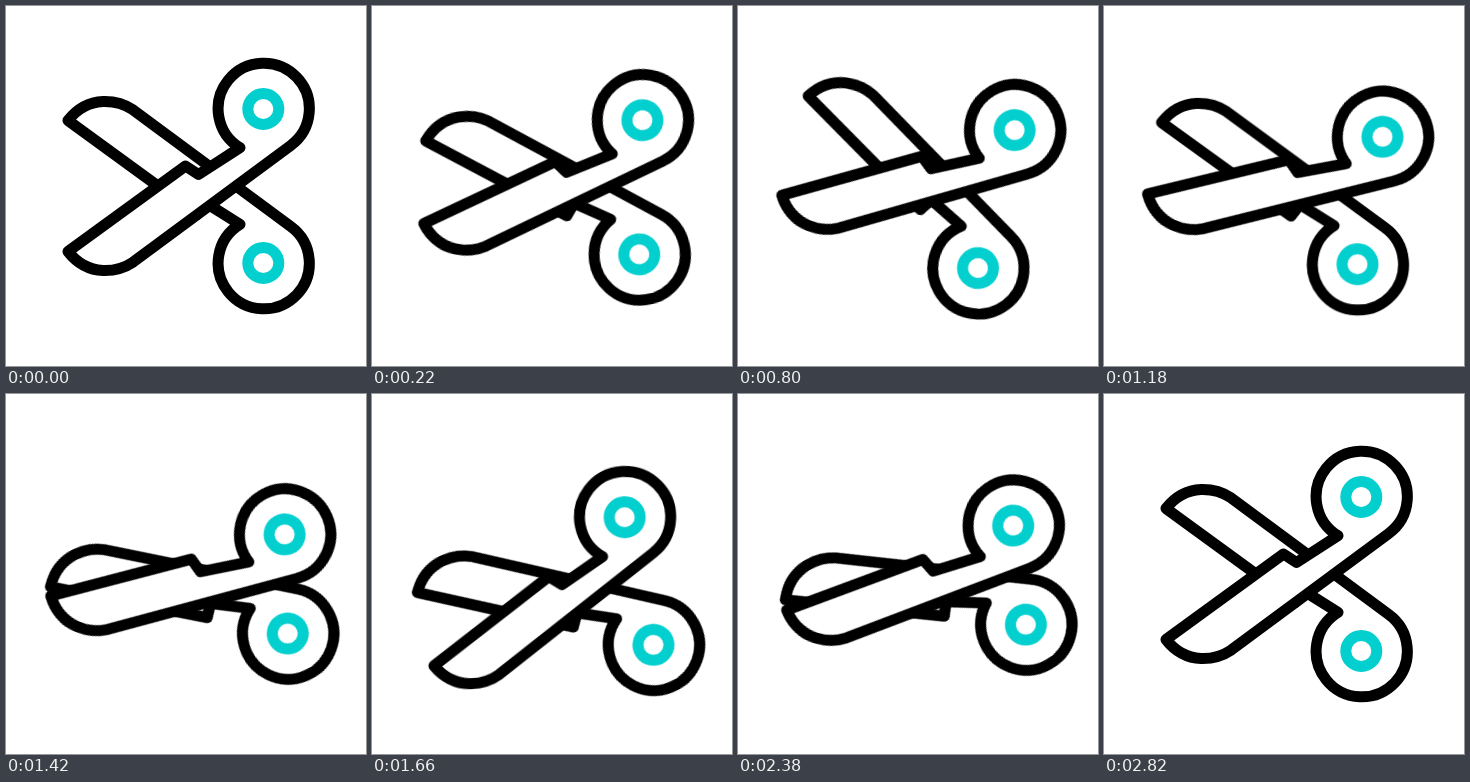
Animation of 360 by 360 pixels, one loop 3.6 s. Source, as an HTML page:

```html
<!DOCTYPE html>
<html lang="en">
<head>
<meta charset="utf-8">
<title>Scissors</title>
<style>
  html, body { margin: 0; width: 100%; height: 100%; overflow: hidden; background: #fff; }
  svg { display: block; width: 100vw; height: 100vh; }
  path { fill: #fff; stroke: #000; }
  circle { fill: none; stroke: #04cfcf; }
  path, circle { stroke-width: 11; stroke-linejoin: round; }
  g { transform-origin: 203.5px 180px; }
</style>
</head>
<body>
<svg viewBox="0 0 360 360">
  <g id="body">
    <g id="back">
      <path d="M62 114.5 L191 208.5 L200 197 L234 218.3 A45.6 45.6 0 1 0 284.6 220.4 L127 103.8 Q114 95 97 95.5 Q76 96.5 62 114.5 Z"/>
      <circle cx="257.3" cy="257" r="15.5"/>
    </g>
    <g id="front">
      <path d="M62 245.5 L179.5 160 L192.5 168.5 L234 141.7 A45.6 45.6 0 1 1 284.6 139.6 L127 256.2 Q114 265 97 264.5 Q76 263.5 62 245.5 Z"/>
      <circle cx="257.3" cy="103" r="15.5"/>
    </g>
  </g>
</svg>
<script>
  const LOOP = 3600, START = 16, END = 2820;
  const SNIP = (END - START) / 3;
  const SMOOTH = 'cubic-bezier(.333,0,.667,1)';

  // rows: [time, angle, x, y, easing]
  function play(id, rows) {
    const frames = rows.map(([time, angle, x = 0, y = 0, easing = SMOOTH]) => ({
      offset: time / LOOP,
      transform: `translate(${x}px, ${y}px) rotate(${angle}deg)`,
      easing
    }));
    document.getElementById(id).animate(frames, { duration: LOOP, iterations: Infinity });
  }

  // three snips: closed angle at every odd half step
  function snips(angle) {
    const rows = [[0, 0]];
    for (let i = 0; i <= 6; i++) rows.push([START + i * SNIP / 2, i % 2 ? angle : 0]);
    return [...rows, [LOOP, 0]];
  }

  play('front', snips(23.2));
  play('back', snips(-23.2));
  play('body', [
    [0, 0],
    [START, 0, 0, 0, 'cubic-bezier(.45,0,.65,1)'],
    [START + SNIP, 16, -4.5, -2.75, 'cubic-bezier(.37,0,.55,1)'],
    [START + 2 * SNIP, -16, -1.9, 24.7],
    [END, 0],
    [LOOP, 0]
  ]);
</script>
</body>
</html>
```
